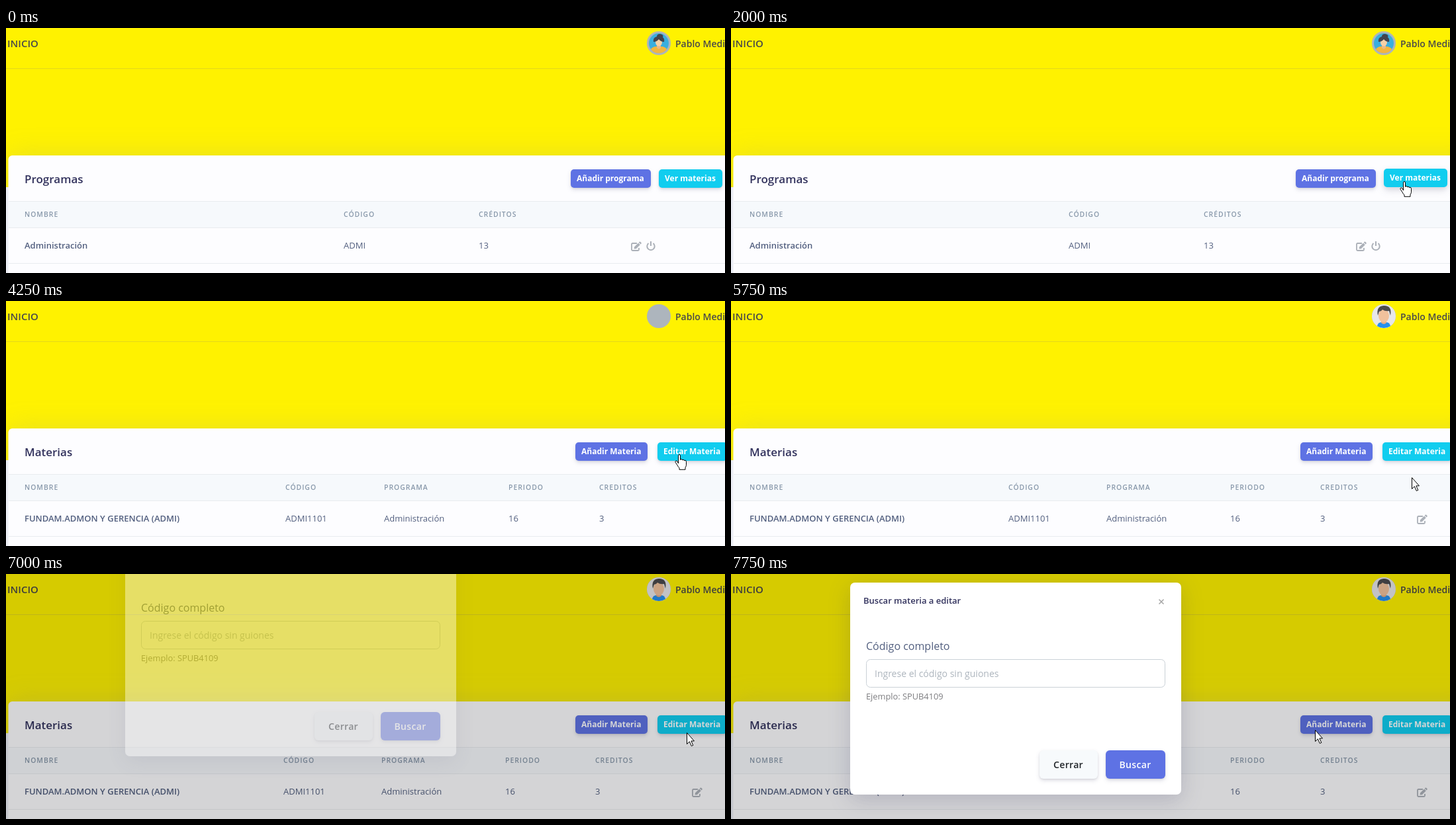
Recreate the animation shown at these times as an HTML page. Size 1086x371 px, loop 8000 ms.

```html
<!DOCTYPE html>
<html lang="es">
<head>
<meta charset="utf-8">
<style>
html, body { margin: 0; height: 100%; overflow: hidden; }
svg { display: block; width: 1086px; height: 371px; font: 13px "Open Sans", sans-serif; fill: #525f7f; }
.semi { font-weight: 600; }
.title { font-size: 17px; font-weight: 600; fill: #32325d; }
.head { font-size: 10.4px; font-weight: 600; letter-spacing: 1px; fill: #8898aa; }
.small { font-size: 12px; font-weight: 700; fill: #fff; }
.big { font-size: 14px; font-weight: 600; letter-spacing: .35px; }
.card { filter: drop-shadow(0 0 20px rgba(136,152,170,.2)); }
.raised { filter: drop-shadow(0 3px 3px rgba(50,50,93,.15)) drop-shadow(0 1px 1px rgba(0,0,0,.08)); }
.hover { filter: drop-shadow(0 5px 6px rgba(50,50,93,.14)) drop-shadow(0 2px 3px rgba(0,0,0,.08)); }
.dialog { filter: drop-shadow(0 8px 16px rgba(50,50,93,.2)); }
</style>
</head>
<body>
<svg viewBox="0 0 1086 371">
  <defs>
    <g id="edit">
      <path d="M9 3H2.4Q1 3 1 4.4v8.2Q1 14 2.4 14h8.2q1.4 0 1.4-1.4V10" fill="none" stroke="#abb0b8" stroke-width="1.8"/>
      <path d="M5 8.4l6-6L13.8 5.2l-6 6-3.2.4zM11.7 1.7l1-1q.7-.6 1.4 0l1.4 1.4q.6.7 0 1.4l-1 1z" fill="#abb0b8"/>
    </g>
  </defs>

  <rect width="1086" height="371" fill="#f8f9fe"/>
  <rect width="1086" height="241" fill="#fff200"/>
  <rect y="61" width="1086" height="1" fill="#e3d81c"/>
  <text x="2" y="29" font-size="15" class="semi" fill="#494949">INICIO</text>
  <text x="1011" y="29" font-size="14" class="semi" fill="#494949">Pablo Medina</text>

  <circle cx="986" cy="23" r="18" fill="#adb5bd"/>
  <g id="avatar0">
    <circle cx="986" cy="23" r="15" fill="#3aaede"/>
    <path d="M974 32q3-4 8-4h8q5 0 8 4-4 6-12 6t-12-6z" fill="#f3b63f"/>
    <path d="M983 25h6v5l-3 2-3-2z" fill="#e9b98c"/>
    <ellipse cx="986" cy="21.500" rx="5" ry="6" fill="#f6d0a6"/>
    <path d="M978 21q-1-7 5-8 0-4 5-4 6 1 4 5 3 2 2 7-5 0-8-4-3 4-8 4z" fill="#43434d"/>
  </g>
  <g id="avatar1">
    <circle cx="986" cy="23" r="18" fill="#e7e7e9"/>
    <path d="M976 38q1-6 7-6h6q6 0 7 6-10 6-20 0z" fill="#2590ee"/>
    <path d="M982 28h8v5q-4 4-8 0z" fill="#e3ab84"/>
    <ellipse cx="986" cy="22.500" rx="8" ry="10" fill="#f1c19c"/>
    <path d="M977 22q-3-14 9-15 13 0 10 15l-2-7q-6 1-10-2-2 3-5 3z" fill="#4b4a4d"/>
  </g>

  <rect x="3.500" y="193" width="1120" height="220" rx="6" fill="#fdfdff" class="card"/>
  <rect x="4" y="262" width="1082" height="41" fill="#e9ecef"/>
  <rect x="4" y="263" width="1082" height="39" fill="#f6f9fc"/>
  <rect x="4" y="356" width="1082" height="1" fill="#e9ecef"/>
  <text x="28" y="286" class="head">NOMBRE</text>
  <g id="table"></g>
  <g id="icons0">
    <use href="#edit" x="944" y="323"/>
    <path d="M970.500 326a5.700 5.700 0 1 0 7 0M974 323v7" fill="none" stroke="#abb0b8" stroke-width="2"/>
  </g>
  <use id="icons1" href="#edit" x="1036" y="323"/>

  <g id="overlay">
    <rect width="1086" height="371" fill="#000" opacity=".16"/>
    <g id="modal">
      <rect x="180" y="13" width="500" height="321" rx="7" fill="#fff" class="dialog"/>
      <text x="200" y="45" class="semi" fill="#32325d">Buscar materia a editar</text>
      <path d="M646.500 38.500l7 7m0-7l-7 7" stroke="#a5a5a5" stroke-width="1.500"/>
      <text x="204" y="115" font-size="16">Código completo</text>
      <rect x="204.500" y="129.500" width="451" height="42" rx="6" fill="#fff" stroke="#cad1d7"/>
      <text x="217" y="156" font-size="14" fill="#adb5bd">Ingrese el código sin guiones</text>
      <text x="204" y="190" font-size="12.800" fill="#7d7d80">Ejemplo: SPUB4109</text>
      <rect x="466" y="267" width="88" height="43" rx="6" fill="#f7fafc" class="raised"/>
      <text x="487" y="294" class="big" fill="#212529">Cerrar</text>
      <rect x="566" y="267" width="90" height="43" rx="6" fill="#5e72e4" class="raised"/>
      <text x="586.500" y="294" class="big" fill="#fff">Buscar</text>
    </g>
  </g>
  <path id="cursor" fill="#fff" stroke="#000" stroke-linejoin="round"/>
</svg>
<script>
const $ = id => document.getElementById(id);
const ARROW = 'M.5 .5V17.500l3.900-3.700 2.900 6.700 2.500-1.100-2.900-6.500H11.500z';
const HAND = 'M5.500 14V2.200q0-1.700 1.500-1.700t1.500 1.700v6.300q.3-1 1.600-1t1.400 1.600q.3-.9 1.600-.8t1.400 1.600' +
  'q.3-.7 1.400-.6 1.600.2 1.600 2v5q0 2-1.500 4v3h-9v-2.500q-2-2-3-4.200l-2.800-4.300q-.8-1.500.5-2.200 1.200-.5 2.300.8z';

// Each view: title, column positions, headings, row cells, buttons as [x, width, label]
const programs = {
  title: 'Programas', cols: [510, 714], heads: ['CÓDIGO', 'CRÉDITOS'],
  name: 'Administración', cells: ['ADMI', '13'],
  buttons: [[853, 121, 'Añadir programa'], [986, 96, 'Ver materias']]
};
const loading = {
  title: 'Materias', cols: [422, 571, 759, 896], heads: ['CÓDIGO', 'PROGRAMA', 'PERIODO', 'CREDITOS'],
  name: 'FUNDAM.ADMON Y GERENCIA (ADMI)', cells: ['ADMI1101', 'Administración', '16', '3'],
  buttons: [[860, 109, 'Añadir Materia'], [984, 105, 'Editar Materia']]
};
const subjects = { ...loading, cols: [419, 567, 754, 890] };

// Start time, view, avatar, cursor [shape, x, y], state of the cyan button
const steps = [
  [0, programs, 0, null, 'rest'],
  [1000, programs, 0, [ARROW, 609, 319], 'rest'],
  [1250, programs, 0, [ARROW, 774, 274], 'rest'],
  [1500, programs, 0, [ARROW, 947, 258], 'rest'],
  [1750, programs, 0, [HAND, 1010, 232], 'hover'],
  [3000, programs, 0, [HAND, 1010, 232], 'press'],
  [3250, programs, 0, [HAND, 1010, 232], 'hover'],
  [4250, loading, -1, [HAND, 1010, 232], 'rest'],
  [4500, subjects, -1, [HAND, 1010, 232], 'rest'],
  [4750, subjects, 1, [HAND, 1010, 232], 'rest'],
  [5250, subjects, 1, [HAND, 1010, 232], 'hover'],
  [5500, subjects, 1, [ARROW, 999, 282], 'rest'],
  [5750, subjects, 1, [ARROW, 1028, 267], 'rest'],
  [6000, subjects, 1, [HAND, 1018, 230], 'hover'],
  [6750, subjects, 1, [HAND, 1018, 230], 'press'],
  [7000, subjects, 1, [ARROW, 1028, 240], 'rest'],
  [7250, subjects, 1, [ARROW, 1028, 240], 'rest'],
  [7750, subjects, 1, [ARROW, 882, 236], 'rest']
];

const text = (x, y, cls, s) => `<text x="${x}" y="${y}" class="${cls}">${s}</text>`;

function button([x, w, label], fill, state) {
  const up = state === 'rest' ? 0 : 1;
  return `<rect x="${x}" y="${214 - up}" width="${w}" height="28" rx="5" fill="${fill}" class="${up ? 'hover' : 'raised'}"/>` +
    text(x + 9, 232 - up, 'small', label);
}

function table(v, state) {
  return text(28, 235, 'title', v.title) + text(28, 334, 'semi', v.name) +
    v.cols.map((x, i) => text(x, 286, 'head', v.heads[i]) + text(x, 334, '', v.cells[i])).join('') +
    button(v.buttons[0], '#5e72e4', 'rest') +
    button(v.buttons[1], state === 'press' ? '#0da5c0' : '#11cdef', state);
}

const show = (id, on) => $(id).style.display = on ? '' : 'none';
let current;

function draw(now) {
  requestAnimationFrame(draw);
  const t = now % 8000;
  const step = steps.findLast(s => s[0] <= t);
  if (step === current) return;
  current = step;
  const [start, view, avatar, cursor, state] = step;
  $('table').innerHTML = table(view, state);
  show('avatar0', avatar === 0);
  show('avatar1', avatar === 1);
  show('icons0', view === programs);
  show('icons1', view === subjects);
  show('overlay', start >= 7000);
  $('modal').setAttribute('transform', `translate(0 ${start === 7000 ? -58 : 0})`);
  $('modal').setAttribute('opacity', start === 7000 ? .4 : 1);
  show('cursor', cursor);
  if (cursor) {
    $('cursor').setAttribute('d', cursor[0]);
    $('cursor').setAttribute('transform', `translate(${cursor[1]} ${cursor[2]})`);
  }
}
draw(performance.now());
</script>
</body>
</html>
```
